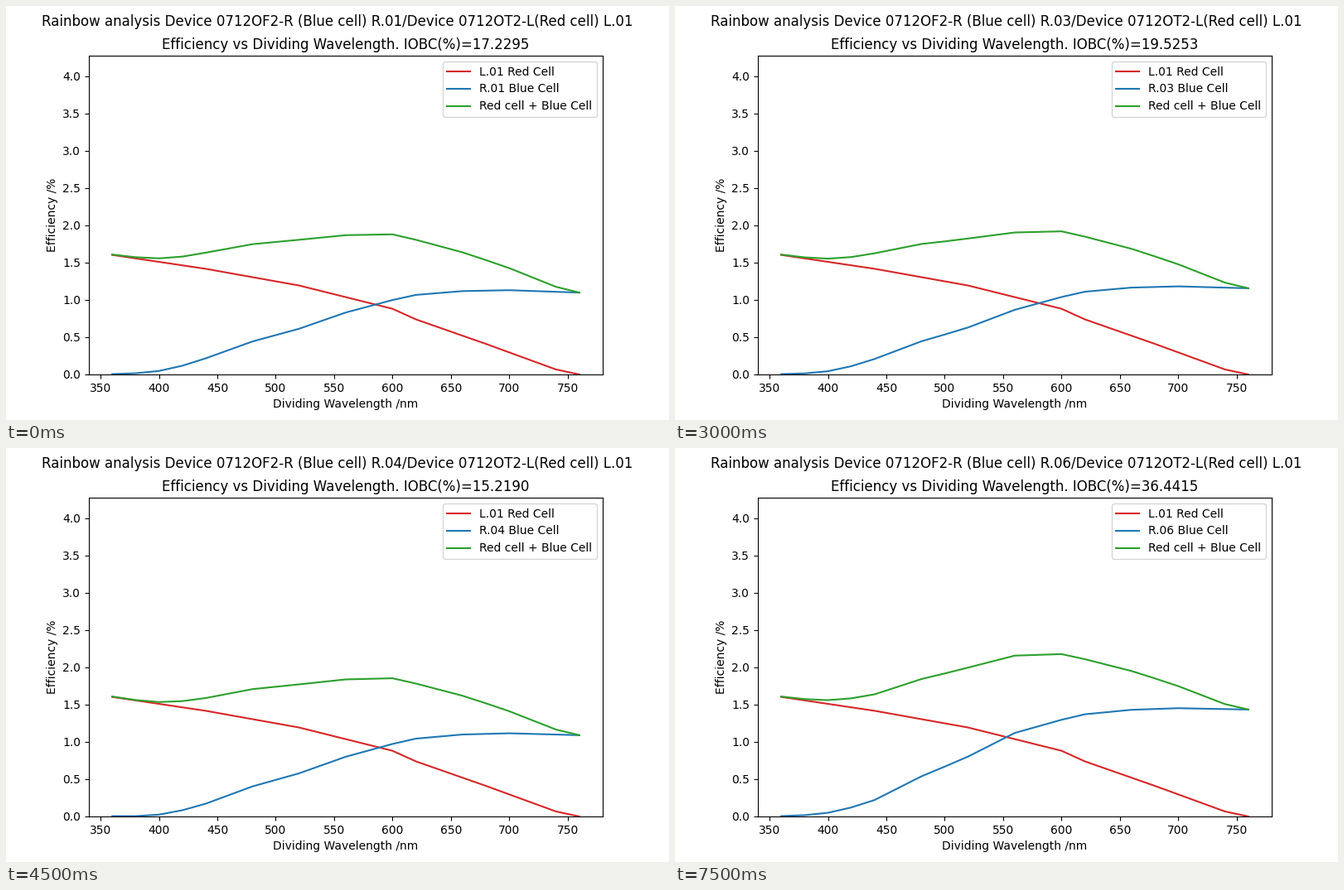
Recreate the animation shown at these times as a matplotlib script. Size 800 by 500 pixels, loop 8000 ms.

```python
import numpy as np
import matplotlib.pyplot as plt
from matplotlib.animation import FuncAnimation

STEP_MS = 500       # one animation frame
FRAMES = 16
HOLD = 3            # frames each blue cell stays on screen

wavelength = np.arange(360, 761, 20)


def curve(*points):
    """Sample a curve given by (wavelength, efficiency) key points."""
    return np.interp(wavelength, *zip(*points))


red = curve((360, 1.603), (440, 1.417), (520, 1.193), (600, 0.881),
            (620, 0.739), (680, 0.410), (740, 0.067), (760, 0))
base = curve((360, 0.005), (380, 0.016), (400, 0.047), (420, 0.117), (440, 0.216),
             (480, 0.442), (520, 0.613), (560, 0.831), (600, 0.998), (620, 1.067),
             (660, 1.118), (700, 1.130), (760, 1.098))

# IOBC in %, and the gain over the base cell at 440, 500, 560 and 760 nm
cells = [
    (17.2295, (0, 0, 0, 0)),
    (19.1010, (0.003, 0.015, 0.029, 0.060)),
    (19.5253, (-0.008, 0.008, 0.036, 0.058)),
    (15.2190, (-0.045, -0.037, -0.030, -0.008)),
    (23.3896, (-0.036, 0.025, 0.076, 0.227)),
    (36.4415, (0.005, 0.141, 0.289, 0.336)),
]


def blue_cell(gains):
    gain = curve((360, 0), *zip((440, 500, 560, 760), gains))
    return np.maximum(base + gain, 0)


plt.rcParams["font.family"] = "DejaVu Sans"
fig, ax = plt.subplots(figsize=(8, 5), dpi=100)
fig.subplots_adjust(left=0.125, right=0.9, bottom=0.11, top=0.88)


def draw(frame):
    index = min(frame // HOLD, len(cells) - 1)
    iobc, gains = cells[index]
    blue = blue_cell(gains)
    name = f"R.{index + 1:02d}"

    ax.clear()
    ax.plot(wavelength, red, color="tab:red", label="L.01 Red Cell")
    ax.plot(wavelength, blue, color="tab:blue", label=f"{name} Blue Cell")
    ax.plot(wavelength, red + blue, color="tab:green", label="Red cell + Blue Cell")
    ax.set_xlim(340, 780)
    ax.set_ylim(0, 4.275)
    ax.set_xlabel("Dividing Wavelength /nm")
    ax.set_ylabel("Efficiency /%")
    ax.set_title(f"Efficiency vs Dividing Wavelength. IOBC(%)={iobc:.4f}")
    ax.legend(loc="upper right")
    fig.suptitle(f"Rainbow analysis Device 0712OF2-R (Blue cell) {name}"
                 "/Device 0712OT2-L(Red cell) L.01")
    return []


anim = FuncAnimation(fig, draw, frames=FRAMES, init_func=lambda: draw(0),
                     interval=STEP_MS, repeat=True, repeat_delay=0)
plt.show()
```
